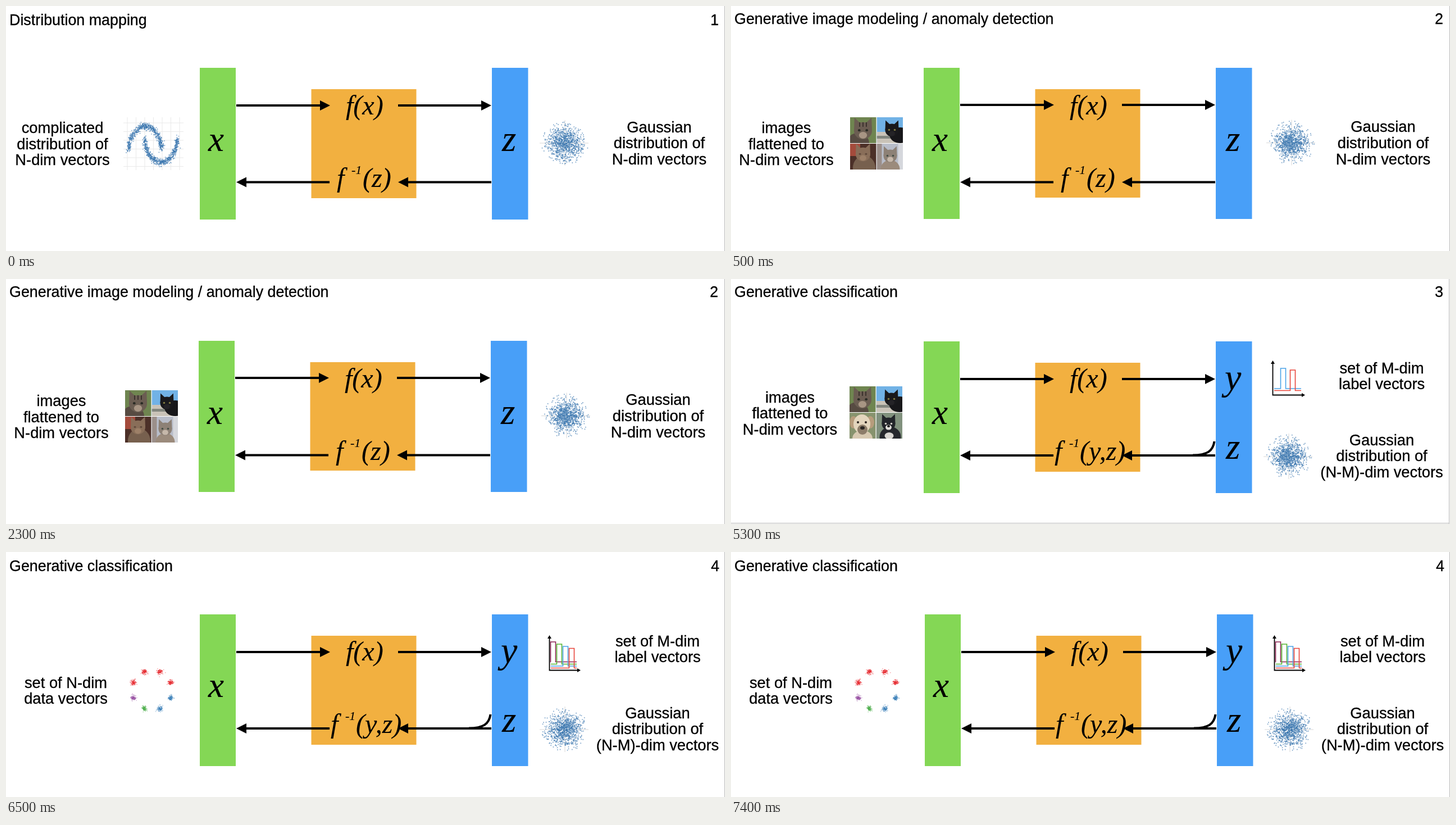
An HTML page with a canvas for the animation above (8 s loop, 1280 px wide and 436 px high).

```html
<!DOCTYPE html>
<html lang="en">
<head>
<meta charset="utf-8">
<title>Distribution mapping</title>
<style>
  html, body { margin: 0; width: 100%; height: 100%; overflow: hidden; background: #fff; }
  canvas { display: block; }
</style>
</head>
<body>
<canvas id="stage" width="1280" height="436"></canvas>
<script>
const ctx = document.getElementById('stage').getContext('2d');
const SANS = '"Liberation Sans", Arial, sans-serif';
const SERIF = '"Liberation Serif", Times, serif';
const DOT_BLUE = '#3a76af', RED = '#e8443a', SKY = '#4ba3e8';

let seed;
function random() {
  seed = (seed * 1664525 + 1013904223) % 4294967296;
  return seed / 4294967296;
}
function gauss() {
  return Math.sqrt(-2 * Math.log(1 - random())) * Math.cos(2 * Math.PI * random());
}

function rect(x, y, w, h, color) {
  ctx.fillStyle = color;
  ctx.fillRect(x, y, w, h);
}
function write(str, x, y, font, align, weight) {
  ctx.font = font;
  ctx.textAlign = align;
  ctx.fillStyle = ctx.strokeStyle = '#000';
  ctx.lineWidth = weight;
  ctx.fillText(str, x, y);
  ctx.strokeText(str, x, y);
}
function text(str, x, y, size = 27.3, align = 'center') {
  write(str, x, y, `${size}px ${SANS}`, align, 0.3);
}
function lines(rows, x, y) {
  rows.forEach((row, i) => text(row, x, y + i * 28.7));
}
function math(str, x, y, size = 48) {
  write(str, x, y, `italic ${size}px ${SERIF}`, 'left', 0.1);
}
function path(points, color, width) {
  ctx.beginPath();
  points.forEach(p => ctx.lineTo(...p));
  ctx.strokeStyle = color;
  ctx.lineWidth = width;
  ctx.stroke();
}
function poly(points, color) {
  ctx.beginPath();
  points.forEach(p => ctx.lineTo(...p));
  ctx.fillStyle = color;
  ctx.fill();
}
function ellipse(x, y, rx, ry, color) {
  ctx.beginPath();
  ctx.ellipse(x, y, rx, ry, 0, 0, 7);
  ctx.fillStyle = color;
  ctx.fill();
}
function dot(x, y, r, color, alpha) {
  ctx.globalAlpha = alpha;
  ellipse(x, y, r, r, color);
  ctx.globalAlpha = 1;
}
function arrow(x1, x2, y) {
  const back = x2 - 18 * Math.sign(x2 - x1);
  path([[x1, y], [back, y]], '#000', 4);
  poly([[x2, y], [back, y - 9], [back, y + 9]], '#000');
}

function gaussian(x, y) {
  path([[x - 45, y], [x + 42, y]], '#d8d8d8', 1);
  path([[x, y - 41], [x, y + 40]], '#d8d8d8', 1);
  for (let i = 0; i < 1000; i++) {
    const u = gauss() * 15.5, v = gauss() * 14.5;
    if (Math.hypot(u / 42, v / 39) < 1) dot(x + u, y + v, 1, DOT_BLUE, 0.65);
  }
}
function moons() {
  for (let x = 216; x < 316; x += 15.5) path([[x, 198], [x, 292]], '#e9e9e9', 1);
  for (let y = 208; y < 292; y += 15.5) path([[209, y], [316, y]], '#e9e9e9', 1);
  for (let i = 0; i < 1300; i++) {
    const a = Math.PI * random(), s = i % 2 ? 1 : -1;
    dot((s > 0 ? 276 : 248) + 29 * Math.cos(a) + gauss() * 2,
        (s > 0 ? 235 : 257) + s * 43 * Math.sin(a) + gauss() * 3, 0.85, DOT_BLUE, 0.75);
  }
}
function ring() {
  const blue = '#377eb8', red = '#e8252a';
  [blue, blue, '#4daf4a', '#984ea3', red, red, red, red].forEach((color, k) => {
    const a = (k + 0.5) * Math.PI / 4;
    for (let i = 0; i < 110; i++) {
      dot(260 + 35.7 * Math.cos(a) + gauss() * 2.4, 246 + 35.7 * Math.sin(a) + gauss() * 2.4,
          0.75, color, 0.55);
    }
  });
}

// Each pulse is [left, top, base, color].
function chart(x, y, top, right, pulses) {
  path([[x, top + 4], [x, y], [right - 4, y]], '#000', 1.8);
  poly([[x, top], [x - 3.5, top + 6], [x + 3.5, top + 6]], '#000');
  poly([[right, y], [right - 6, y - 3.5], [right - 6, y + 3.5]], '#000');
  for (const [left, peak, base, color] of pulses) {
    path([[x + 2.5, base], [left, base], [left, peak], [left + 9, peak],
          [left + 9, base], [right - 7, base]], color, 1.6);
  }
}

function tile(x, y, background, draw) {
  ctx.save();
  ctx.translate(x, y);
  ctx.beginPath();
  ctx.rect(0, 0, 46.5, 46);
  ctx.clip();
  rect(0, 0, 47, 46, background);
  draw();
  ctx.restore();
}
function catHead(x, y, r, fur, muzzle, eyes) {
  for (const s of [-1, 1]) {
    poly([[x + s * r, y], [x + s * r * 0.95, y - r * 1.45], [x + s * r * 0.2, y - r * 0.75]], fur);
  }
  ellipse(x, y, r, r * 0.95, fur);
  ellipse(x, y + r * 0.5, r * 0.45, r * 0.38, muzzle);
  for (const s of [-1, 1]) ellipse(x + s * r * 0.42, y - r * 0.05, r * 0.15, r * 0.13, eyes);
}
function tabby() {
  ellipse(14, 46, 20, 18, '#574b42');
  catHead(23, 24, 16, '#6b5d52', '#a89584', '#2a2b25');
  for (const x of [17, 23, 29]) path([[x, 9], [x, 17]], '#3b332d', 2);
}
function blackCat() {
  rect(0, 26, 47, 20, '#c9c3b8');
  rect(0, 33, 30, 5, '#83877f');
  ellipse(42, 32, 19, 14, '#17171a');
  catHead(27, 23, 12, '#19191c', '#242327', '#827c42');
}
function brownCat() {
  rect(0, 0, 18, 22, '#a44b3c');
  ellipse(25, 43, 20, 22, '#77604e');
  catHead(23, 19, 13, '#896e59', '#9d8068', '#60493b');
}
function greyCat() {
  rect(0, 0, 9, 46, '#9b8f8a');
  rect(38, 0, 9, 46, '#d5d7dc');
  ellipse(24, 45, 17, 16, '#9b8b7c');
  catHead(24, 22, 12, '#8d8176', '#c6b8aa', '#434d44');
}
function paleDog() {
  ellipse(23, 46, 18, 15, '#d7c9b1');
  for (const s of [-1, 1]) ellipse(22 + s * 15, 17, 7, 11, '#b79c7c');
  ellipse(22, 20, 15, 17, '#e3d5bd');
  ellipse(23, 30, 9, 9, '#8d7d6a');
  ellipse(23, 27, 4, 3, '#292522');
  for (const s of [-1, 1]) ellipse(22 + s * 7, 17, 2, 2, '#29211d');
}
function darkDog() {
  ellipse(25, 43, 19, 18, '#25272d');
  catHead(22, 20, 12, '#22242a', '#e3dfdc', '#d6d1cb');
  ellipse(22, 24, 2.5, 2, '#111');
  ellipse(23, 41, 8, 6, '#d9d6d2');
}
function photos(x, y, lowerLeft, lowerRight) {
  tile(x, y, '#6f8550', tabby);
  tile(x + 47.5, y, '#71b2e6', blackCat);
  tile(x, y + 47, ...lowerLeft);
  tile(x + 47.5, y + 47, ...lowerRight);
}

function heading(title, number, y, right) {
  text(title, 6, y, 26.85, 'left');
  text(number, right, y, 26.85, 'right');
}
function diagram(dx, top, height, boxY, boxHeight, upper, lower, labelled) {
  ctx.save();
  ctx.translate(dx, 0);
  rect(345, top, 64, height, '#84d755');
  rect(543.5, boxY, 187, boxHeight, '#f2b040');
  rect(865, top, 64.5, height, '#489ff8');
  arrow(410, 577, upper);
  arrow(698, 864, upper);
  arrow(864, 698, lower);
  arrow(576, 410, lower);
  math('x', 360, 258, 63);
  math('f(x)', 605, 193);
  if (labelled) {
    ctx.beginPath();
    ctx.moveTo(862.5, 289);
    ctx.bezierCurveTo(860, 306, 850, 313.5, 824, 313.5);
    ctx.strokeStyle = '#000';
    ctx.lineWidth = 4;
    ctx.stroke();
    math('f', 578, 322);
    math('-1', 604, 299, 22);
    math('(y,z)', 623, 322);
    math('y', 881, 197, 66);
    math('z', 883, 320, 65);
  } else {
    math('f', 589, 322);
    math('-1', 615, 299, 22);
    math('(z)', 635, 322);
    math('z', 883, 257.5, 65);
  }
  ctx.restore();
}

const GAUSSIAN_TEXT = ['Gaussian', 'distribution of', 'N-dim vectors'];
const REST_TEXT = ['Gaussian', 'distribution of', '(N-M)-dim vectors'];
const LABEL_TEXT = ['set of M-dim', 'label vectors'];
const IMAGE_TEXT = ['images', 'flattened to', 'N-dim vectors'];

const scenes = [
  { start: 0, draw() {
    heading('Distribution mapping', '1', 34, 1269);
    diagram(0, 110, 270, 148, 194, 177, 313.5);
    lines(['complicated', 'distribution of', 'N-dim vectors'], 100.5, 226);
    moons();
    gaussian(995, 244);
    lines(GAUSSIAN_TEXT, 1163, 224.7);
  } },
  { start: 500, draw() {
    heading('Generative image modeling / anomaly detection', '2', 31.5, 1268);
    diagram(-2, 110, 269, 148, 193, 176, 313.5);
    lines(IMAGE_TEXT, 98.5, 226);
    photos(212, 198, ['#4c3028', brownCat], ['#b8bdc9', greyCat]);
    gaussian(998, 243.5);
    lines(GAUSSIAN_TEXT, 1161, 224.4);
  } },
  { start: 3500, draw() {
    heading('Generative classification', '3', 31.5, 1268);
    diagram(-2, 111, 270, 149, 194, 178, 314, true);
    lines(IMAGE_TEXT, 105, 219.7);
    photos(211, 191, ['#87936e', paleDog], ['#81917e', darkDog]);
    chart(964.5, 206.5, 145, 1022, [[978.5, 159, 195, SKY], [995.5, 162, 198.5, RED]]);
    lines(LABEL_TEXT, 1158.5, 167.7);
    gaussian(993, 316);
    lines(REST_TEXT, 1158.5, 295.7);
  } },
  { start: 6500, draw() {
    heading('Generative classification', '4', 34, 1270);
    diagram(0, 111, 270, 149, 194, 178, 314, true);
    lines(['set of N-dim', 'data vectors'], 106.5, 241.7);
    ring();
    chart(967.5, 210.5, 148, 1023, [
      [969.5, 160, 195.5, '#8b2252'], [980.5, 164, 199.5, '#55b432'],
      [991.5, 168, 203, SKY], [1002.5, 171.5, 206.5, RED]]);
    lines(LABEL_TEXT, 1160, 167.7);
    gaussian(995, 316);
    lines(REST_TEXT, 1160, 295.7);
  } }
];

let shown;
function tick() {
  const t = performance.now() % 8000;
  const scene = scenes.findLast(s => t >= s.start);
  if (scene !== shown) {
    shown = scene;
    seed = 7;
    rect(0, 0, 1280, 436, '#fff');
    const inset = scene === scenes[2] ? 1 : 0;
    rect(1279 - inset, 0, 1, 436, '#b8b8b8');
    if (inset) rect(0, 434, 1279, 1, '#b8b8b8');
    scene.draw();
  }
  requestAnimationFrame(tick);
}
tick();
</script>
</body>
</html>
```
